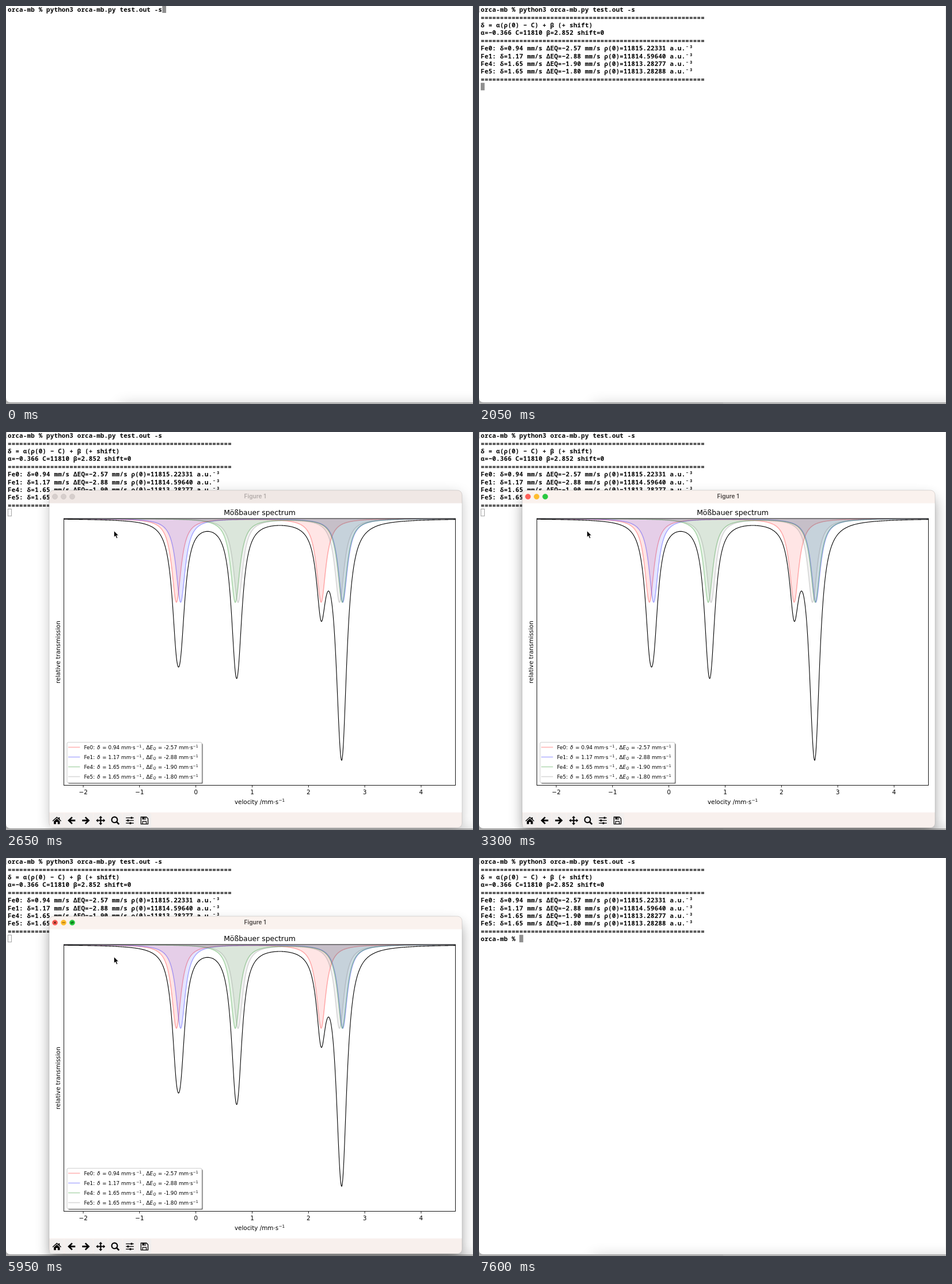
These frames come from a looping animation (811 px wide and 690 px high, 8 s). An HTML page:

```html
<!DOCTYPE html>
<html lang="en">
<head>
<meta charset="utf-8">
<title>Mößbauer spectrum</title>
<style>
  html, body { margin: 0; width: 100%; height: 100%; overflow: hidden; background: #fff; }
  svg { display: block; width: 811px; height: 690px; }
  .term { font: 600 10.9px "Noto Sans Mono", "DejaVu Sans Mono", monospace; letter-spacing: .17px; white-space: pre; }
  .plot { font: 10.35px "DejaVu Sans", sans-serif; }
  .mid { text-anchor: middle; }
  .legend { font-size: 8.85px; white-space: pre; }
  .sup { font-size: 6.3px; }
  .it { font-style: italic; }
  .title { font: 600 10.2px Inter, "Open Sans", sans-serif; text-anchor: middle; }
  .line { fill: none; stroke: #000; }
</style>
</head>
<body>
<svg id="stage" viewBox="0 0 811 690" xmlns="http://www.w3.org/2000/svg">
  <defs>
    <filter id="soft" x="-30%" y="-200%" width="160%" height="500%"><feGaussianBlur stdDeviation="13"/></filter>
    <filter id="blur" x="-20%" y="-20%" width="140%" height="140%"><feGaussianBlur stdDeviation="12"/></filter>
    <clipPath id="body"><path d="M0 0H810V687H8Q0 687 0 679Z"/></clipPath>
    <clipPath id="frame"><rect x="75" y="101" width="717" height="585" rx="8"/></clipPath>
    <clipPath id="axes"><rect x="100.5" y="150" width="680" height="462.5"/></clipPath>
  </defs>
  <rect width="811" height="690" fill="#b4b4b4"/>
  <rect y="680" width="424" height="10" fill="#adadad"/>
  <g clip-path="url(#body)">
    <rect width="811" height="690" fill="#fff"/>
    <rect x="198" y="692" width="667" height="30" fill="#000" opacity=".22" filter="url(#soft)"/>
  </g>
  <path d="M810.5 0V687" stroke="#e4e4e4"/>
  <g id="term" class="term"></g>
  <path id="mark" d="M2 .5H.5V10.5H2" fill="none" stroke="#a8a8a8" stroke-width=".8"/>
  <rect id="caret" width="6.7" height="13"/>
  <g id="win">
    <rect id="shadow" x="77" width="713" height="581" rx="8" filter="url(#blur)"/>
    <g clip-path="url(#frame)">
      <rect x="75" y="101" width="717" height="585" fill="#fff"/>
      <rect id="bar" x="75" y="101" width="717" height="22.5"/>
      <rect x="75" y="659.5" width="717" height="27" fill="#f8f0ed"/>
    </g>
    <rect x="75" y="101" width="717" height="585" rx="8" fill="none" stroke="#000" stroke-opacity=".16" stroke-width=".8"/>
    <g id="lights"></g>
    <g id="glyphs" fill="none" stroke="#4a1508" stroke-width="1.1">
      <path d="M83.1 110.1l3.8 3.8m0-3.8l-3.8 3.8"/>
      <path d="M97.3 112h5.4" stroke="#8a5500"/>
      <path d="M112.7 110.2v3.6h3.6zM117.3 113.8v-3.6h-3.6z" fill="#06600c" stroke="none"/>
    </g>
    <text id="title" class="title" x="432.5" y="115.4">Figure 1</text>
    <g id="plot" class="plot"></g>
    <g id="tools"></g>
    <path d="M187.5 171.3V182.4L190 180.1 191.9 184.4 194 183.5 192.1 179.4H195.6Z" fill="#000" stroke="#fff" stroke-width=".8"/>
  </g>
</svg>
<script>
const NS = 'http://www.w3.org/2000/svg';
const $ = id => document.getElementById(id);

function add(parent, tag, attrs, text) {
  const el = document.createElementNS(NS, tag);
  set(el, attrs);
  if (text !== undefined) el.textContent = text;
  parent.appendChild(el);
  return el;
}
function set(el, attrs) {
  for (const k in attrs) el.setAttribute(k, attrs[k]);
}
const show = (el, on) => set(el, { visibility: on ? 'visible' : 'hidden' });
const minus = s => s.replace('-', '−');

// Iron sites: shift, splitting, density, colour
const sites = [
  ['Fe0', 0.94, -2.57, '11815.22331', '#ff0000'],
  ['Fe1', 1.17, -2.88, '11814.59640', '#0000ff'],
  ['Fe4', 1.65, -1.90, '11813.28277', '#008000'],
  ['Fe5', 1.65, -1.80, '11813.28288', '#808080']
];

// Terminal text
const CELL = 6.71, ROW = 13.42;
const rule = '='.repeat(58);
const prompt = 'orca-mb % ';
const rows = [
  prompt + 'python3 orca-mb.py test.out -s',
  rule,
  'δ = α(ρ(0) − C) + β (+ shift)',
  'α=−0.366 C=11810 β=2.852 shift=0',
  rule,
  ...sites.map(([name, d, q, rho]) =>
    `${name}: δ=${d.toFixed(2)} mm/s ΔEQ=${minus(q.toFixed(2))} mm/s ρ(0)=${rho} a.u.⁻³`),
  rule,
  prompt
].map((s, i) => add($('term'), 'text', { x: 3, y: 10.1 + i * ROW }, s));

// Spectrum
const plot = $('plot');
const LEFT = 100.5, RIGHT = 780.5, TOP = 150, BOTTOM = 612.5;
const DEPTH = 145, HALF = 0.1;
const toX = v => 329.7 + 97.8 * v;
const toV = x => (x - 329.7) / 97.8;
const dip = (v, c) => 1 / (1 + ((v - c) / HALF) ** 2);
const doublet = (v, [, d, q]) => dip(v, d - q / 2) + dip(v, d + q / 2);
const total = v => sites.reduce((sum, s) => sum + doublet(v, s), 0);

function curve(f) {
  let d = '';
  for (let x = LEFT; x <= RIGHT; x += 0.5)
    d += (d ? 'L' : 'M') + x + ' ' + (TOP + DEPTH * f(toV(x))).toFixed(2);
  return d;
}

const curves = add(plot, 'g', { 'clip-path': 'url(#axes)' });
for (const s of sites) {
  const d = curve(v => doublet(v, s));
  add(curves, 'path', { d: d + `L${RIGHT} ${TOP}H${LEFT}Z`, fill: s[4], opacity: 0.1 });
  add(curves, 'path', { d, class: 'line', style: `stroke:${s[4]}`, 'stroke-width': 1.55, opacity: 0.3 });
}
add(curves, 'path', { d: curve(total), class: 'line', 'stroke-width': 1.1 });
add(plot, 'rect', { x: LEFT, y: TOP, width: RIGHT - LEFT, height: BOTTOM - TOP, class: 'line', 'stroke-width': 0.9 });

for (let v = -2; v <= 4; v++) {
  add(plot, 'path', { d: `M${toX(v)} ${BOTTOM}v3.7`, class: 'line', 'stroke-width': 0.9 });
  add(plot, 'text', { x: toX(v), y: 628.4, class: 'mid' }, minus(String(v)));
}
add(plot, 'text', { x: 440.5, y: 143.6, class: 'mid', style: 'font-size:12.4px' }, 'Mößbauer spectrum');
add(plot, 'text', { class: 'mid', transform: 'translate(94 381.5) rotate(-90)' }, 'relative transmission');
add(plot, 'text', { x: 397, y: 644.5 }, 'velocity /mm·s');
add(plot, 'text', { x: 473.5, y: 640.6, style: 'font-size:7.3px' }, '−1');

// Legend
const legend = add(plot, 'g', { class: 'legend' });
add(legend, 'rect', { x: 108, y: 540, width: 234, height: 70, rx: 2, fill: '#000', opacity: 0.45 });
add(legend, 'rect', { x: 106, y: 538, width: 234, height: 70, rx: 2, fill: '#fff', stroke: '#ccc' });
sites.forEach(([name, d, q, , color], i) => {
  const y = 546.5 + 17 * i, base = y + 3.3;
  const put = (x, text, cls = '', dy = 0) => add(legend, 'text', { x, y: base + dy, class: cls }, text);
  add(legend, 'path', { d: `M108 ${y}h20.5`, class: 'line', style: `stroke:${color}`, 'stroke-width': 1.55, opacity: 0.3 });
  put(135.5, name + ':');
  put(158.2, 'δ', 'it');
  put(167.3, `= ${d.toFixed(2)} mm·s`);
  put(226.3, '−1', 'sup', -3.3);
  put(237, ',');
  put(243.5, 'Δ');
  put(249.6, 'E', 'it');
  put(255.4, 'Q', 'sup it', 1.5);
  put(264, `= ${q.toFixed(2)} mm·s`);
  put(324.5, '−1', 'sup', -3.3);
});

// Toolbar icons, each drawn around its own centre
const arrow = 'M-6.5 0L.3-6.6 2.2-4.7-1.1-1.4H6.6V1.4H-1.1L2.2 4.7.3 6.6Z';
const head = 'M0-8L3-4.6H1V0H-1V-4.6H-3Z';
const icons = [
  g => add(g, 'path', { d: 'M0-6.4L2.9-3.7V-5.6H4.9V-1.9L7.7.6 6.8 1.6 0-4.5-6.8 1.6-7.7.6ZM0-3.3L5.2 1.4V6.3H1.5V2.4H-1.5V6.3H-5.2V1.4Z' }),
  g => add(g, 'path', { d: arrow }),
  g => add(g, 'path', { d: arrow, transform: 'scale(-1 1)' }),
  g => [0, 90, 180, 270].forEach(a => add(g, 'path', { d: head, transform: `rotate(${a})` })),
  g => {
    add(g, 'circle', { cx: -1.2, cy: -1.2, r: 4.9, class: 'line', 'stroke-width': 2.1 });
    add(g, 'path', { d: 'M2.6 2.6L6.6 6.6', class: 'line', 'stroke-width': 2.7 });
  },
  g => [[-4.6, 3], [0, -3.2], [4.6, 1]].forEach(([y, x]) => {
    add(g, 'path', { d: `M-6.8 ${y}H6.8`, class: 'line', 'stroke-width': 1.3 });
    add(g, 'rect', { x: x - 1.4, y: y - 1.7, width: 2.8, height: 3.4, rx: 0.5 });
  }),
  g => {
    add(g, 'path', { d: 'M-6-6H3.4L6.2-3.2V6.2H-6Z', class: 'line', 'stroke-width': 1.3 });
    add(g, 'path', { d: 'M-3.8-6H2.6V-1.8H-3.8ZM-3.8 6V1H3.8V6H2.6V2.2H-2.6V6Z' });
    add(g, 'rect', { x: 0.2, y: -5, width: 1.5, height: 2.4, fill: '#fff' });
  }
];
icons.forEach((draw, i) => {
  const g = add($('tools'), 'g', { transform: `translate(${88.3 + 25.35 * i} 673.5)` });
  add(g, 'rect', { x: -12, y: -12.5, width: 24, height: 24.5, rx: 2, fill: '#f2efee' });
  draw(g);
});

const lights = [85, 100, 115].map(cx =>
  add($('lights'), 'circle', { cx, cy: 112, r: 4.6, 'stroke-width': 0.5 }));

// Timeline in ms
const LOOP = 8000;
const at = { enter: 1700, output: 2050, open: 2600, focus: 2700, hover: 5550, press: 6900, close: 7050, done: 7200 };

function render(t) {
  const isOpen = t >= at.open && t < at.done;
  const focused = t >= at.focus;
  const done = t >= at.done;

  rows.forEach((row, i) => show(row, i === 0 || (i < rows.length - 1 ? t >= at.output : done)));
  show($('mark'), t >= at.enter);

  const [col, line] = t < at.enter ? [40, 0] : t < at.output ? [0, 1] : done ? [10, 10] : [0, 10];
  set($('caret'), {
    x: 3 + col * CELL + (isOpen ? 0.4 : 0),
    y: -1 + line * ROW + (isOpen ? 0.3 : 0),
    width: isOpen ? 6 : CELL,
    height: isOpen ? 12.2 : 13,
    fill: isOpen ? 'none' : '#8f8f8f',
    stroke: isOpen ? '#999' : 'none',
    'stroke-width': 0.9
  });

  show($('win'), isOpen);
  show($('glyphs'), isOpen && t >= at.hover);
  const step = Math.floor((t - at.close) / 50) + 1;
  set($('win'), { opacity: t < at.close ? 1 : Math.max(0, 1 - step / 4) });
  set($('shadow'), { y: focused ? 115 : 109, opacity: focused ? 0.42 : 0.26 });
  set($('bar'), { fill: focused ? '#faf2ee' : '#f0e8e5' });
  set($('title'), { fill: focused ? '#4b4644' : '#b2aba9' });
  const colors = focused
    ? [t >= at.press ? '#c2443e' : '#fe5f57', '#febc2e', '#28c840']
    : ['#d6cecc', '#d6cecc', '#d6cecc'];
  lights.forEach((c, i) => set(c, { fill: colors[i], stroke: focused ? colors[i] : '#c6bebb' }));
}

const start = performance.now();
function tick() {
  render((performance.now() - start) % LOOP);
  requestAnimationFrame(tick);
}
render(0);
requestAnimationFrame(tick);
</script>
</body>
</html>
```
